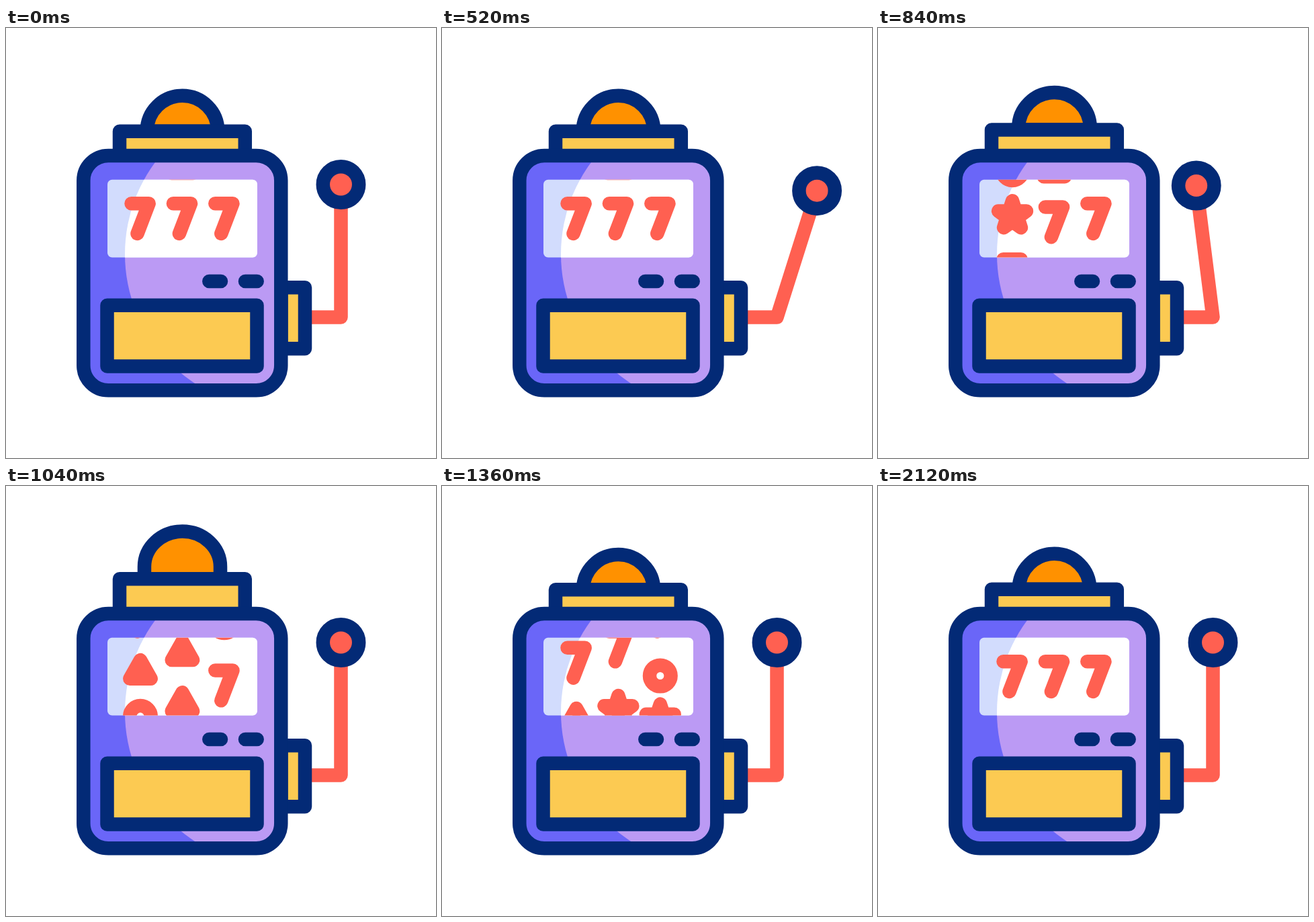
An HTML page that plays this animation: 640x640 px, repeating every 2.4 s.

```html
<!DOCTYPE html>
<html lang="en">
<head>
<meta charset="utf-8">
<title>Slot machine</title>
<style>
  html, body { margin: 0; width: 100%; height: 100%; overflow: hidden; background: #fff; }
  svg { display: block; width: 100%; height: 100%; }
  .line { stroke: #032a76; stroke-width: 20.5; stroke-linejoin: round; }
  .red { stroke: #ff6051; stroke-width: 20.5; stroke-linecap: round; stroke-linejoin: round; }
  .gold { fill: #fcca52; }
  .none { fill: none; }
</style>
</head>
<body>
<svg viewBox="0 0 640 640">
  <defs>
    <clipPath id="bodyClip"><rect x="115.3" y="190" width="294" height="349.3" rx="37"/></clipPath>
    <clipPath id="windowClip"><rect x="151" y="225.7" width="223" height="115.8" rx="7"/></clipPath>
    <!-- Reel symbols: centred on x = 0, top edge at y = 0 -->
    <path id="seven" class="red none" d="M-13.5 10.2H12.7L-4.5 55"/>
    <circle id="ring" class="red none" cy="26" r="15.8"/>
    <path id="triangle" class="red" fill="#ff6051" d="M0 10.2L15.7 38H-15.7Z"/>
    <path id="star" class="red" fill="#ff6051"/>
  </defs>

  <path id="dome" class="line" fill="#ff9100"/>
  <path id="base" class="line gold"/>

  <path id="arm" class="red none"/>
  <circle id="knob" class="line" r="26.7" fill="#ff6051"/>
  <rect class="line gold" x="409.5" y="386.2" width="35.5" height="91"/>

  <g clip-path="url(#bodyClip)">
    <rect x="105" y="180" width="315" height="370" fill="#6a66f8"/>
    <circle cx="407" cy="336.5" r="230" fill="#bb9af4"/>
  </g>
  <rect class="line none" x="115.3" y="190" width="294" height="349.3" rx="37"/>

  <g clip-path="url(#windowClip)">
    <rect x="150" y="225" width="225" height="118" fill="#d2dcfd"/>
    <circle cx="407" cy="336.5" r="230" fill="#fff"/>
    <g id="reels"></g>
  </g>

  <path class="line" stroke-linecap="round" d="M302.3 377H320M356 377H373.7"/>
  <rect class="line gold" x="150.5" y="412.8" width="223" height="90.8"/>
</svg>
<script>
const LOOP = 2400;
const $ = id => document.getElementById(id);

// Each symbol: [shape, starting top edge, distance travelled]
const REELS = [
  [['seven', 251, 305], ['star', 164, 305], ['ring', 102, 305], ['triangle', 27, 315], ['seven', -52, 303]],
  [['seven', 251, 305], ['triangle', 178, 305], ['triangle', 102, 305], ['star', 35, 313], ['seven', -52, 303]],
  [['seven', 251, 305], ['ring', 164, 305], ['star', 101, 303], ['ring', 29, 323], ['seven', -52, 303]]
];
const LEVER = [[200, 0], [460, 19.7], [800, -8], [1000, 0]];
const BOUNCE = [[800, 0], [980, 1.18], [1240, -0.15], [1420, 0]];

const starPoints = Array.from({ length: 10 }, (_, i) => {
  const r = i % 2 ? 8.5 : 22, a = i * Math.PI / 5;
  return `${r * Math.sin(a)} ${32.2 - r * Math.cos(a)}`;
});
$('star').setAttribute('d', `M${starPoints.join('L')}Z`);

const symbols = REELS.map(reel => reel.map(([shape]) => {
  const use = document.createElementNS('http://www.w3.org/2000/svg', 'use');
  use.setAttribute('href', '#' + shape);
  return $('reels').appendChild(use);
}));

// Sine easing between [time, value] keys
function track(keys, t) {
  if (t <= keys[0][0]) return keys[0][1];
  for (let i = 1; i < keys.length; i++) {
    const [t0, v0] = keys[i - 1], [t1, v1] = keys[i];
    if (t < t1) return v0 + (v1 - v0) * (1 - Math.cos(Math.PI * (t - t0) / (t1 - t0))) / 2;
  }
  return keys[keys.length - 1][1];
}

// cubic-bezier(.335, 0, .05, 1)
function spinEase(x) {
  if (x <= 0) return 0;
  if (x >= 1) return 1;
  let lo = 0, hi = 1, s;
  for (let i = 0; i < 24; i++) {
    s = (lo + hi) / 2;
    const bx = 3 * (1 - s) ** 2 * s * 0.335 + 3 * (1 - s) * s * s * 0.05 + s ** 3;
    if (bx < x) lo = s; else hi = s;
  }
  return s * s * (3 - 2 * s);
}

function draw(t) {
  const angle = track(LEVER, t) * Math.PI / 180;
  const x = 498.5 + 197.5 * Math.sin(angle), y = 430.5 - 197.5 * Math.cos(angle);
  $('arm').setAttribute('d', `M445 430.5H498.5L${x} ${y}`);
  $('knob').setAttribute('cx', x);
  $('knob').setAttribute('cy', y);

  const up = track(BOUNCE, t);
  const rx = 52.8 + 3.7 * up, cy = 153.5 - 33 * up, top = 153.8 - 15.5 * up;
  $('dome').setAttribute('d',
    `M${262.5 - rx} ${top}V${cy}A${rx} 52.7 0 0 1 ${262.5 + rx} ${cy}V${top}Z`);
  $('base').setAttribute('d', `M169 195V${top}H355.8V195Z`);

  REELS.forEach((reel, i) => {
    const spin = spinEase((t - 600 - 160 * i) / 1200);
    reel.forEach(([, start, travel], j) =>
      symbols[i][j].setAttribute('transform', `translate(${200 + 62.4 * i} ${start + travel * spin})`));
  });
}

const began = performance.now();
function tick() {
  draw((performance.now() - began) % LOOP);
  requestAnimationFrame(tick);
}
tick();
</script>
</body>
</html>
```
